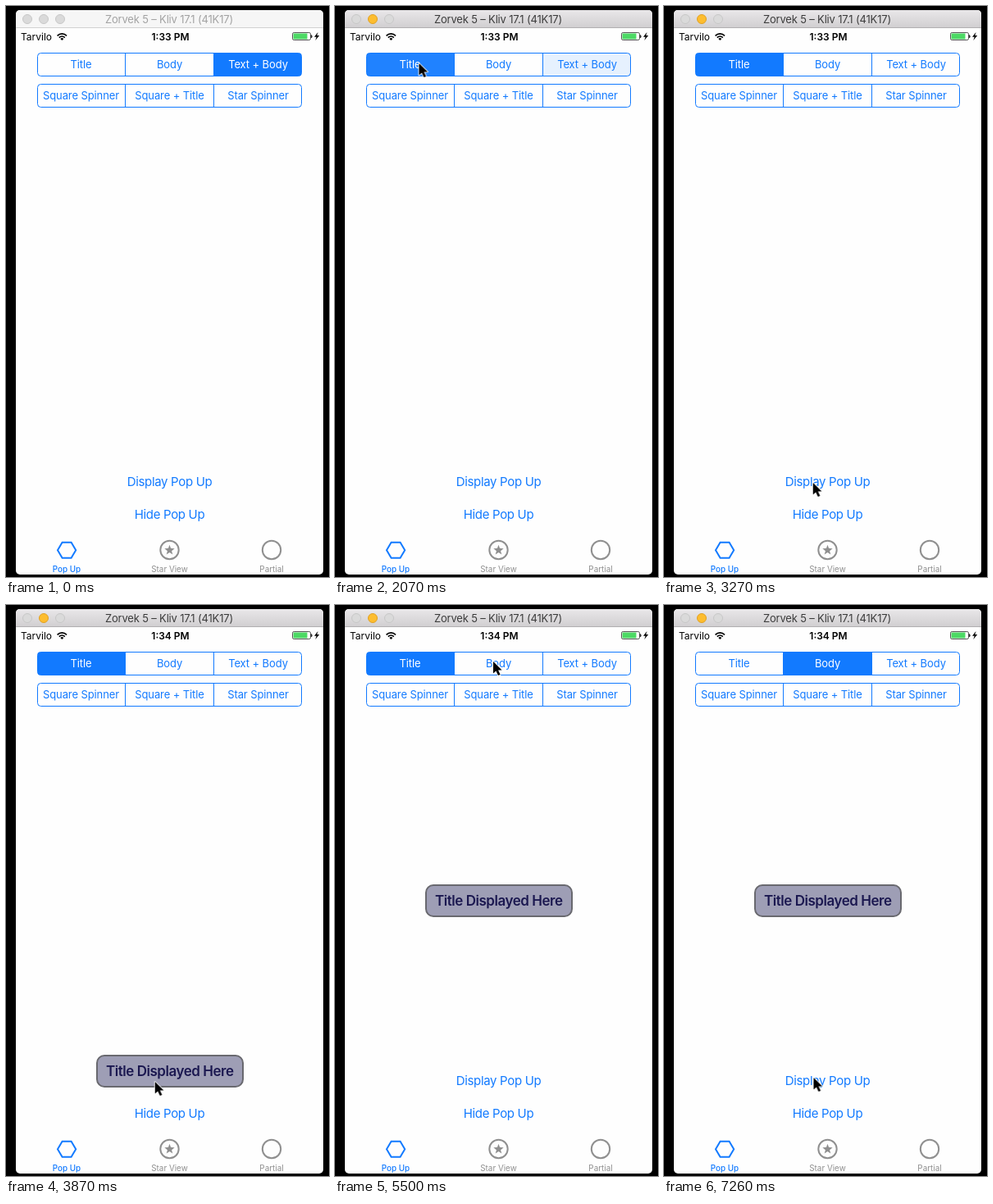
Write an HTML page that moves like this. It is 394 px wide and 697 px high and loops after 8 s.

```html
<!DOCTYPE html>
<html lang="en">
<head>
<meta charset="utf-8">
<title>Pop up demo</title>
<style>
  html, body { margin: 0; width: 100%; height: 100%; overflow: hidden; background: #000; }
  svg { display: block; width: 394px; height: 697px; font-family: Inter, Roboto, sans-serif; }
  text { text-anchor: middle; }
  .blue { fill: #127aff; }
  .line { fill: none; stroke: #127aff; }
  .segment { font-size: 13px; letter-spacing: -.1px; }
  .button { font-size: 15px; letter-spacing: -.33px; }
  .tab { font-size: 9.9px; }
  .gray { fill: #8f8f8f; }
  .clock { font-size: 12px; font-weight: 600; }
</style>
</head>
<body>
<svg viewBox="0 0 394 697">
  <defs>
    <linearGradient id="chrome" x2="0" y2="1">
      <stop stop-color="#e9e7e9"/><stop offset="1" stop-color="#d0ced0"/>
    </linearGradient>
    <clipPath id="window"><rect x="12" y="5" width="375" height="689" rx="5"/></clipPath>
    <clipPath id="pill"><rect x="38" y="57" width="323" height="29" rx="4.5"/></clipPath>
  </defs>

  <rect width="394" height="697"/>
  <g clip-path="url(#window)">
    <rect x="12" y="5" width="375" height="689" fill="#fefefe"/>
    <rect x="12" y="5" width="375" height="22" fill="#f6f6f6"/>
    <rect x="12" y="26" width="375" height="1" fill="#d2d2d2"/>
    <g id="active">
      <rect x="12" y="5" width="375" height="22" fill="url(#chrome)"/>
      <rect x="12" y="26" width="375" height="1" fill="#b1afb1"/>
    </g>
  </g>
  <g fill="#dadada" stroke="#c6c6c6">
    <circle cx="26" cy="16" r="5.5"/>
    <circle id="amber" cx="46" cy="16" r="5.5"/>
    <circle cx="66" cy="16" r="5.5"/>
  </g>
  <text id="caption" x="199" y="21" font-size="13" letter-spacing="-.17">Zorvek 5 – Kliv 17.1 (41K17)</text>

  <!-- status bar -->
  <text x="18" y="42" font-size="12" style="text-anchor:start">Tarvilo</text>
  <g fill="none" stroke="#000" stroke-width="1.7">
    <path d="M62.6 36.3a8 8 0 0 1 11.4 0M64.8 38.6a5 5 0 0 1 7 0"/>
    <path d="M68.3 42l-2-2.1a2.8 2.8 0 0 1 4 0z" fill="#000" stroke="none"/>
  </g>
  <text id="before" class="clock" x="200.5" y="42">1:33 PM</text>
  <text id="after" class="clock" x="200.5" y="42">1:34 PM</text>
  <rect x="349.5" y="32.5" width="22" height="9" rx="1.7" fill="#fff" stroke="#555"/>
  <rect x="350.5" y="33.5" width="17" height="7" fill="#4cd964"/>
  <path d="M372.5 35.5q1.5 1.5 0 3.5z" stroke="#333"/>
  <path d="M380.5 32l-4.5 5.7h2.7l-1.4 4.4 4.9-6h-2.8z"/>

  <!-- segmented controls -->
  <g id="segments"></g>

  <text class="blue button" x="199.5" y="585.5">Display Pop Up</text>
  <text class="blue button" x="199.5" y="625.5">Hide Pop Up</text>

  <!-- tab bar -->
  <path class="line" stroke-width="2" d="M63 664.2l5.6-9.5h11l5.6 9.5-5.6 9.5h-11z"/>
  <g fill="none" stroke="#8f8f8f" stroke-width="2">
    <circle cx="199.5" cy="664" r="11.2"/>
    <circle cx="324" cy="664" r="11.2"/>
  </g>
  <path id="star" class="gray"/>
  <text class="blue tab" x="74" y="690.5" font-weight="500">Pop Up</text>
  <text class="gray tab" x="199.5" y="690.5">Star View</text>
  <text class="gray tab" x="324" y="690.5">Partial</text>

  <g id="popup">
    <rect x="111" y="342" width="178" height="38" rx="9" fill="#9e9eb5" stroke="#69696f" stroke-width="2"/>
    <text x="199.8" y="366.7" font-size="17" font-weight="600" letter-spacing="-.47" fill="#1b1850">Title Displayed Here</text>
  </g>

  <path id="cursor" d="M0 0V14.6L3.4 11.4 6 17 8.6 15.9 6.1 10.4H10.6Z"
        stroke="#fff" stroke-width="1.6" paint-order="stroke" stroke-linejoin="round"/>
</svg>

<script>
const LOOP = 8000;
const BLUE = '#127aff';
const $ = id => document.getElementById(id);

// Each step is [time in ms, value]; a value holds until the next step.
function play(el, prop, steps) {
  const frames = steps.map(([time, value]) =>
    ({ offset: time / LOOP, [prop]: value, easing: 'step-end' }));
  frames.push({ offset: 1, [prop]: steps[steps.length - 1][1] });
  el.animate(frames, { duration: LOOP, iterations: Infinity });
}

const move = (time, x, y) => [time, `translate(${x}px, ${y}px)`];

function segmentRow(y, labels) {
  const edges = [38.5, 145.5, 253.5, 360.5];
  const cells = labels.map((label, i) => `
    <rect id="fill-${label}" class="blue" clip-path="url(#pill)" opacity="0"
      x="${edges[i]}" y="${y}" width="${edges[i + 1] - edges[i]}" height="28"/>
    <text id="text-${label}" class="blue segment" x="${[91.5, 199.5, 307.5][i]}" y="${y + 18.7}">${label}</text>`);
  return cells.join('') + `
    <rect class="line" x="38.5" y="${y}" width="322" height="28" rx="4"/>
    <path class="line" d="M145.5 ${y}v28M253.5 ${y}v28"/>`;
}

$('segments').innerHTML =
  segmentRow(57.5, ['Title', 'Body', 'Text + Body']) +
  segmentRow(95.5, ['Square Spinner', 'Square + Title', 'Star Spinner']);

const starPoints = Array.from({ length: 10 }, (_, i) => {
  const r = i % 2 ? 2.7 : 6.5, a = i * Math.PI / 5;
  return `${199.5 + r * Math.sin(a)} ${664.3 - r * Math.cos(a)}`;
});
$('star').setAttribute('d', `M${starPoints.join('L')}Z`);

// Window focus and clock
play($('active'), 'opacity', [[0, 0], [2070, 1]]);
play($('amber'), 'fill', [[0, '#dadada'], [2070, '#fdbd2f']]);
play($('amber'), 'stroke', [[0, '#c6c6c6'], [2070, '#dfa023']]);
play($('caption'), 'fill', [[0, '#a3a3a3'], [2070, '#3c3c3c']]);
play($('before'), 'opacity', [[0, 1], [3870, 0]]);
play($('after'), 'opacity', [[0, 0], [3870, 1]]);

// Selection, with one cross-fade step at each change
const selection = {
  'Title': [[0, 0], [2070, .94], [2220, 1], [6240, .1], [6390, 0]],
  'Body': [[0, 0], [6240, .96], [6390, 1]],
  'Text + Body': [[0, 1], [2070, .1], [2220, 0]]
};
for (const [label, steps] of Object.entries(selection)) {
  play($('fill-' + label), 'opacity', steps);
  play($('text-' + label), 'fill', steps.map(([t, v]) => [t, v > .5 ? '#fff' : BLUE]));
}

// Pop up rises into place
play($('popup'), 'opacity', [[0, 0], [3870, 1]]);
play($('popup'), 'transform', [move(0, 0, 208), move(4020, 0, 56), move(4170, 0, 0)]);

// Pointer
play($('cursor'), 'opacity', [[0, 0], [1040, 1]]);
play($('cursor'), 'transform', [
  move(0, 230, 157), move(1190, 195, 131), move(1340, 145, 97), move(1480, 112, 76), move(1630, 102.5, 70),
  move(2520, 118, 300), move(2670, 146.5, 547),
  move(2970, 160, 563), move(3120, 175, 577), move(3270, 181.7, 582),
  move(4760, 181.7, 449), move(4910, 213, 16),
  move(5210, 208, 32), move(5350, 200, 54), move(5500, 193, 69), move(5640, 190.7, 74),
  move(6530, 189, 150), move(6680, 186, 310), move(6820, 184, 450),
  move(6970, 183, 535), move(7110, 182.5, 568), move(7260, 182.5, 577)
]);
</script>
</body>
</html>
```
